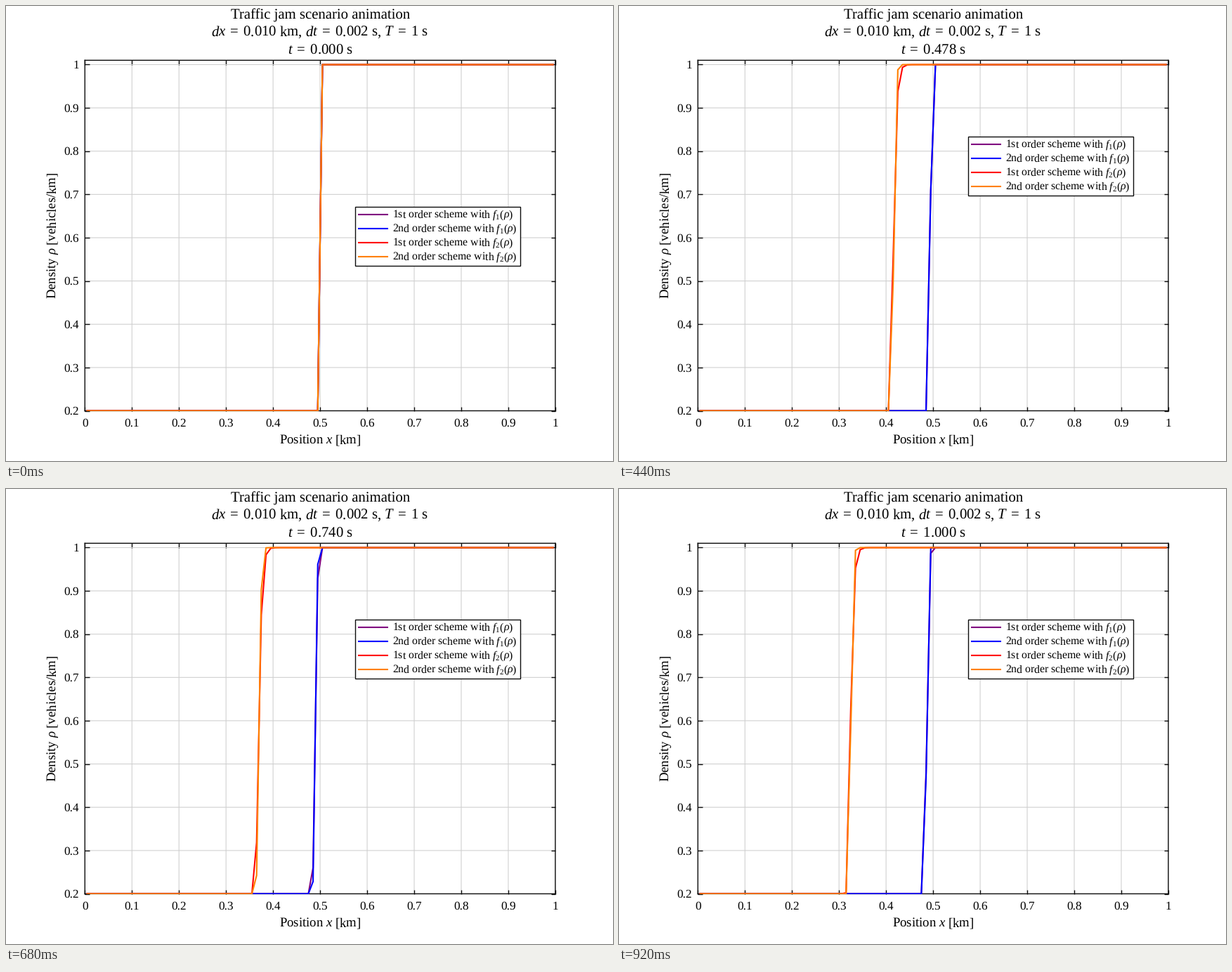
These frames come from a looping animation (864 px wide and 648 px high, 960 ms). A matplotlib script:

```python
import numpy as np
import matplotlib as mpl
import matplotlib.pyplot as plt
from matplotlib.animation import FuncAnimation
from matplotlib.patches import Rectangle
from matplotlib.transforms import Affine2D

W, H, DPI = 864, 648, 72          # at 72 dpi one point is one pixel
FRAMES, INTERVAL = 24, 40
DX, DT, STEPS = 0.01, 0.002, 500
INK = "#0d0d0d"

mpl.rcParams.update({
    "font.family": "Liberation Serif",
    "mathtext.fontset": "custom",
    "mathtext.rm": "Liberation Serif",
    "mathtext.it": "Liberation Serif:italic",
    "text.hinting": "no_hinting",
})


# --- traffic model -------------------------------------------------------

def f1(r):
    return r * (1 - r) / 15


def f2(r):
    r = np.clip(r, 1e-9, 1)
    return -r * np.log10(r)


def half_slopes(p):
    """Half of the van Leer limited slope in every cell."""
    half = np.zeros_like(p)
    a, b = p[1:-1] - p[:-2], p[2:] - p[1:-1]
    half[1:-1] = np.where(a * b > 0, a * b / np.where(a + b == 0, 1, a + b), 0)
    return half


def simulate(flux, crit, second):
    """Godunov scheme, with limited slopes for the second order."""
    r = np.where(x < 0.5, 0.2, 1.0)
    states = [r]
    for _ in range(STEPS):
        p = np.concatenate(([0.2, 0.2], r, [1, 1]))
        half = half_slopes(p) if second else 0 * p
        left, right = (p + half)[1:-2], (p - half)[2:-1]
        q = np.minimum(flux(np.minimum(left, crit)), flux(np.maximum(right, crit)))
        r = r - DT / DX * np.diff(q)
        states.append(r)
    return states


x = (np.arange(100) + 0.5) * DX
schemes = [
    (r"1st order scheme with $f_1(\rho)$", "#800080", simulate(f1, 0.5, False)),
    (r"2nd order scheme with $f_1(\rho)$", "#0000ff", simulate(f1, 0.5, True)),
    (r"1st order scheme with $f_2(\rho)$", "#ff0000", simulate(f2, 1 / np.e, False)),
    (r"2nd order scheme with $f_2(\rho)$", "#ff8000", simulate(f2, 1 / np.e, True)),
]

# --- plot ----------------------------------------------------------------

LEFT, TOP, WIDTH, HEIGHT = 112.3, 77.3, 669.6, 499.2
fig = plt.figure(figsize=(W / DPI, H / DPI), dpi=DPI, facecolor="white")
ax = fig.add_axes([LEFT / W, 1 - (TOP + HEIGHT) / H, WIDTH / W, HEIGHT / H])
ax.set(xlim=(0, 1), ylim=(0.2, 1.01),
       xticks=np.arange(11) / 10, yticks=np.arange(2, 11) / 10)
ax.set_axisbelow(True)
ax.grid(color="#d0d0d0", lw=1.1)
ax.tick_params(direction="in", length=6.5, width=1.4, color=INK, top=True,
               right=True, labelbottom=False, labelleft=False)
for spine in ax.spines.values():
    spine.set(linewidth=1.4, color=INK, snap=False)
for line in [*ax.get_xgridlines(), *ax.get_ygridlines()]:
    line.set_snap(False)

curves = [ax.plot(x, s[0], color=c, lw=2.1, zorder=3, solid_capstyle="projecting",
                  solid_joinstyle="round")[0] for _, c, s in schemes]

# --- labels, in page pixels ----------------------------------------------

page = fig.add_axes([0, 0, 1, 1])
page.set(xlim=(0, W), ylim=(H, 0))
page.axis("off")


def label(px, py, text, size, ha="center", **kw):
    return page.text(px, py, text, size=size, ha=ha, va="baseline", color="black", **kw)


MID = LEFT + WIDTH / 2
for i in range(11):
    label(LEFT + WIDTH * i / 10, 599, f"{i / 10:g}", 17.2)
for i in range(2, 11):
    y = TOP + HEIGHT * (1.01 - i / 10) / 0.81
    label(104, y + 5.5, f"{i / 10:g}", 17.2, ha="right")

label(MID, 18.4, "Traffic jam scenario animation", 20.8)
label(MID, 43, r"$dx\;=\;$0.010 km, $dt\;=\;$0.002 s, $T\;=\;$1 s", 20.8)
clock = label(MID, 68.4, "", 20.8)
label(MID, 623, "Position $x$ [km]", 18.7)
label(72, 327, r"Density $\rho$ [vehicles/km]", 18.7, rotation=90, rotation_mode="anchor")

# --- legend, moved as one block ------------------------------------------

shift = Affine2D()
place = shift + page.transData
page.add_patch(Rectangle((497, 186), 235, 84, fc="white", ec=INK, lw=1.4,
                         transform=place))
for i, (name, color, _) in enumerate(schemes):
    y = 197 + 20 * i
    page.plot([501, 544], [y, y], color=color, lw=2.1, transform=place,
              solid_capstyle="butt")
    label(549.5, y + 5, name, 15.8, ha="left", transform=place)


def draw(i):
    step = round(STEPS * i / (FRAMES - 1))
    for curve, (_, _, states) in zip(curves, schemes):
        curve.set_ydata(states[step])
    clock.set_text(rf"$t\;=\;${step * DT:.3f} s")
    shift.clear().translate(0, 100 if i == 0 else 0)
    return [*curves, clock]


anim = FuncAnimation(fig, draw, frames=FRAMES, interval=INTERVAL, repeat=True, blit=False)
plt.show()
```
